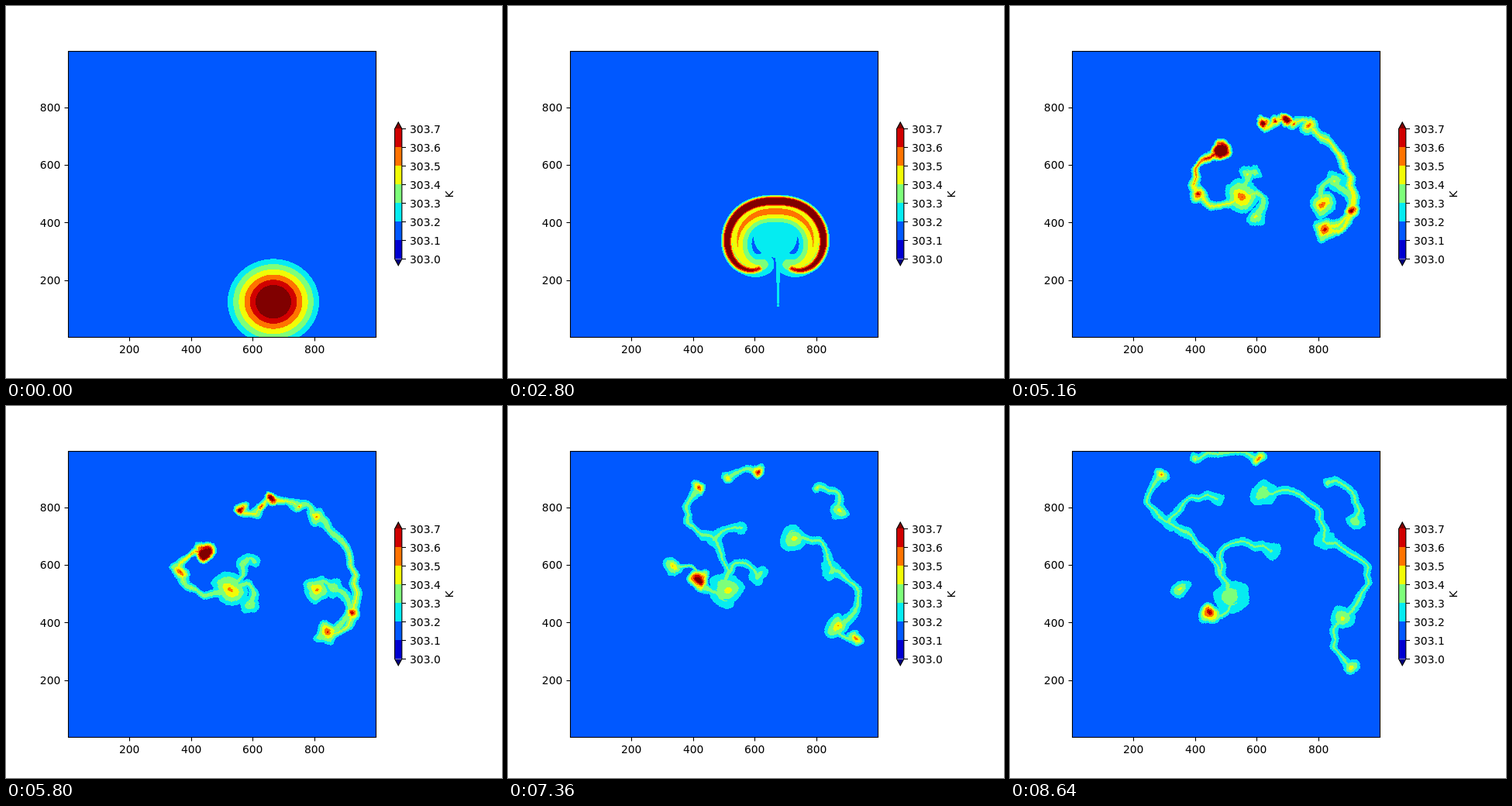
Animation of 640x480 px, one loop 8680 ms. Source, as an HTML page with a canvas:

```html
<!DOCTYPE html>
<html lang="en">
<head>
<meta charset="utf-8">
<title>Rising warm bubble</title>
<style>
  html, body { margin: 0; width: 100%; height: 100%; overflow: hidden; background: #fff; }
  canvas { position: absolute; left: 80px; top: 58px; }
  svg { position: absolute; left: 0; top: 0; }
  text { font: 13.89px "DejaVu Sans", sans-serif; }
</style>
</head>
<body>
<canvas id="field" width="398" height="370"></canvas>
<svg id="chart" width="640" height="480" viewBox="0 0 640 480"></svg>
<script>
const LOOP = 8680, STEP = 40;
const LEFT = 80, TOP = 58, W = 398, H = 370;
const ASPECT = 1.07, MID = 344.5, BREAKUP = 3840;
const COLORS = ['#000080', '#0000d1', '#0058ff', '#05ecf1', '#7dff7a', '#f1fc06', '#ff7300', '#d10000', '#800000'];

const clamp = (v, lo = 0, hi = 1) => Math.max(lo, Math.min(hi, v));
const mix = (a, b, f) => a + (b - a) * f;
function tween(t, times, values) {
  const i = clamp(times.findIndex(k => k > t) - 1, 0, times.length - 2);
  const k = t >= times[times.length - 1] ? times.length - 2 : i;
  return mix(values[k], values[k + 1], clamp((t - times[k]) / (times[k + 1] - times[k])));
}

// --- temperature field: the warmest of many cone-shaped dabs ---

const ctx = document.getElementById('field').getContext('2d');
const image = ctx.createImageData(W, H);
const pixels = new Uint32Array(image.data.buffer);
const heat = new Float32Array(W * H);
const palette = COLORS.map(c => {
  const n = parseInt(c.slice(1), 16);
  return (0xff000000 | (n & 255) << 16 | (n & 0xff00) | n >> 16) >>> 0;
});

function dab(x, y, r, peak) {
  if (r < 0.4) return;
  x -= LEFT; y -= TOP;
  const x0 = Math.max(0, Math.ceil(x - r)), x1 = Math.min(W - 1, Math.floor(x + r));
  const y0 = Math.max(0, Math.ceil(y - r)), y1 = Math.min(H - 1, Math.floor(y + r));
  for (let j = y0; j <= y1; j++) {
    const dy = (j - y) * ASPECT;
    for (let i = x0; i <= x1; i++) {
      const d2 = (i - x) ** 2 + dy * dy, k = j * W + i;
      if (d2 < r * r) heat[k] = Math.max(heat[k], 1 + (peak - 1) * (1 - Math.sqrt(d2) / r));
    }
  }
}

// --- rising cap: a disk that flattens into an arch whose ends roll up ---

const CAP_TIMES = [0, 880, 1760, 2800, BREAKUP, 4500];
const CAP = {
  top: [326, 317, 289, 243, 192, 160],
  halfWidth: [59, 59, 58, 71, 85, 92],
  turn: [3.1, 3.1, 3.1, 3.5, 7, 8],
  rim: [59, 58.5, 32, 9, 10, 0],
  rimHeat: [9.2, 9.2, 9, 11, 9.5, 5],
  inner: [59, 58.5, 32, 20, 13, 0],
  innerHeat: [9.2, 9.2, 8, 4.8, 2.8, 2],
  core: [59, 58, 30, 28, 0, 0],
  coreHeat: [9.2, 9.2, 8, 2, 1.5, 1]
};
const capAt = t => Object.fromEntries(Object.entries(CAP).map(([k, v]) => [k, tween(t, CAP_TIMES, v)]));

// Half of the arch, from the crown outwards; its heading turns ever faster.
function archHalf(cap, inset) {
  const N = 70, points = [];
  let x = 0, y = 0, widest = 0;
  for (let n = 0; n <= N; n++) {
    points.push([x, y]);
    const heading = cap.turn * ((n + 0.5) / N) ** 1.5;
    x += Math.cos(heading); y += Math.sin(heading);
    widest = Math.max(widest, x);
  }
  const scale = Math.max(0, cap.halfWidth - cap.rim - inset) / widest;
  const crown = cap.top + cap.rim / ASPECT + inset;
  return points.map(([px, py]) => [px * scale, crown + py * scale * 1.15]);
}

function drawArch(cap, inset, r, peak) {
  const half = archHalf(cap, inset);
  for (const side of [-1, 1]) {
    let last = null;
    half.forEach(([x, y], n) => {
      if (last && Math.hypot(x - last[0], y - last[1]) < 0.7) return;
      last = [x, y];
      const u = n / half.length;
      dab(MID + side * x, y, r * (1 - 0.25 * u * u), 1 + (peak - 1) * (1 - 0.5 * u * u));
    });
  }
}

function drawCap(t) {
  if (t >= 4500) return;
  const cap = capAt(t);
  drawArch(cap, 0, cap.rim, cap.rimHeat);
  drawArch(cap, 1.2 * Math.max(0, cap.inner - cap.rim), cap.inner, cap.innerHeat);
  dab(MID, cap.top + 55, cap.core, cap.coreHeat);
  const stem = clamp((t - 1600) / 400) * clamp((3400 - t) / 400);
  const foot = 388 + (2800 - t) * 0.035;
  for (let u = 0; stem && u <= 1; u += 0.02)
    dab(MID + 3.5, mix(cap.top + 65, foot, u), stem * mix(5, 1.2, Math.sqrt(u)), 1.6);
}

// --- break-up: the arch falls apart into drifting eddies joined by threads ---

const EDDY_TIMES = [BREAKUP, 5160, 6400, 8640];
const archAtBreakup = archHalf(capAt(BREAKUP), 0);

// An eddy leaves the arch at fraction u of one side and passes three points.
function eddy(side, u, size, peak, ...path) {
  const [x, y] = archAtBreakup[Math.round(u * (archAtBreakup.length - 1))];
  const stops = [[MID + side * x, y], ...path];
  return { side, size, peak, xs: stops.map(p => p[0]), ys: stops.map(p => p[1]) };
}
const eddies = {
  leftVortex: eddy(-1, 1, 26, 5, [297, 245], [280, 228], [285, 245]),
  leftHead: eddy(-1, 0.2, 17, 12, [270, 187], [240, 190], [255, 267]),
  satellite: eddy(-1, 0.45, 14, 6, [241, 243], [207, 187], [219, 234]),
  leftLobe: eddy(-1, 0.75, 14, 3.5, [318, 273], [312, 242], [338, 185]),
  wing: eddy(-1, 0.9, 12, 3.4, [305, 215], [310, 188], [205, 150]),
  wingTip: eddy(-1, 0.9, 10, 3, [315, 215], [325, 186], [268, 118]),
  crownLeft: eddy(-1, 0.05, 11, 8, [325, 150], [283, 115], [194, 89]),
  crown: eddy(1, 0, 9, 6, [340, 150], [318, 108], [238, 67]),
  crownRight: eddy(1, 0.07, 11, 9, [355, 145], [327, 96], [320, 67]),
  shoulder: eddy(1, 0.15, 8, 5, [365, 150], [390, 112], [408, 97]),
  farRight: eddy(1, 0.22, 14, 5, [385, 155], [413, 128], [446, 147]),
  rightFlank: eddy(1, 0.42, 12, 7, [441, 265], [455, 270], [440, 335]),
  rightVortex: eddy(1, 1, 20, 5, [402, 255], [398, 217], [326, 113]),
  rightInner: eddy(1, 0.9, 15, 3.4, [418, 225], [425, 240], [405, 173]),
  rightLobe: eddy(1, 0.6, 18, 6, [405, 288], [421, 294], [427, 273])
};

// Thread between two eddies; bend is its bow as a share of its length.
const thread = (a, b, bend, until = Infinity, from = BREAKUP) => ({ a: eddies[a], b: eddies[b], bend, until, from });
const threads = [
  thread('leftHead', 'satellite', -0.25, 7600),
  thread('satellite', 'leftVortex', -0.25, 6200),
  thread('crownLeft', 'crown', -0.4, 7000),
  thread('crown', 'crownRight', 0.1),
  thread('crownRight', 'shoulder', 0.1, 7300),
  thread('shoulder', 'farRight', 0.3),
  thread('farRight', 'rightFlank', 0.15, 6600),
  thread('rightFlank', 'rightLobe', 0.25),
  thread('rightVortex', 'rightInner', 0.3),
  thread('rightInner', 'rightLobe', 0.45),
  thread('leftVortex', 'leftLobe', 0.6),
  thread('leftVortex', 'leftHead', 0.3, Infinity, 6600),
  thread('leftVortex', 'wing', -0.1),
  thread('crownLeft', 'wing', -0.35, Infinity, 6200),
  thread('wing', 'wingTip', 0.2)
];

const place = (e, t) => [tween(t, EDDY_TIMES, e.xs), tween(t, EDDY_TIMES, e.ys)];

function drawEddy(e, t) {
  const [x, y] = place(e, t);
  const size = e.size * clamp((t - BREAKUP) / 900);
  const peak = 1 + (e.peak - 1) * Math.exp(-Math.max(0, t - 5160) / 5000);
  for (let f = 0; f <= 1; f += 0.02) {
    const angle = e.side * (t / 700 + 7 * f), reach = 0.55 * size * f;
    dab(x + reach * Math.cos(angle), y + reach * Math.sin(angle),
        size * (0.75 - 0.35 * f), 1 + (peak - 1) * (1 - 0.6 * f));
  }
}

function drawThread({ a, b, bend, until, from }, t) {
  const strength = clamp((t - from) / 400) * clamp((until - t) / 400);
  if (!strength) return;
  const [x0, y0] = place(a, t), [x1, y1] = place(b, t);
  const dx = x1 - x0, dy = y1 - y0, fresh = Math.exp(-(t - BREAKUP) / 1400);
  const steps = Math.ceil(Math.hypot(dx, dy) * 0.8) + 2;
  for (let n = 0; n <= steps; n++) {
    const u = n / steps, bow = 4 * bend * u * (1 - u);
    const r = (5.5 + 3.5 * fresh) * (1 + 0.2 * Math.cos(2 * Math.PI * u));
    dab(x0 + dx * u + dy * bow, y0 + dy * u - dx * bow, r * strength,
        2.3 + Math.max(0, mix(a.peak, b.peak, u) - 2.3) * fresh);
  }
}

// --- drawing ---

function render(t) {
  heat.fill(0.5);
  drawCap(t);
  if (t > BREAKUP) {
    threads.forEach(s => drawThread(s, t));
    Object.values(eddies).forEach(e => drawEddy(e, t));
  }
  // A slight ripple makes the contours uneven as the flow turns turbulent.
  const amp = 1.8 * clamp((t - 2400) / 3000);
  const ripple = (s, phase) => Math.round(amp * Math.sin(s / 5.3 + 1.4 * Math.sin(s / 13) + phase + t / 900));
  const shiftY = Array.from({ length: W }, (_, x) => ripple(x, 2));
  for (let y = 0; y < H; y++) {
    const dx = ripple(y, 0);
    for (let x = 0; x < W; x++) {
      const sx = clamp(x + dx, 0, W - 1), sy = clamp(y + shiftY[x], 0, H - 1);
      pixels[y * W + x] = palette[clamp(Math.floor(heat[sy * W + sx]) + 2, 0, 8)];
    }
  }
  ctx.putImageData(image, 0, 0);
}

function drawChart() {
  const line = (x1, y1, x2, y2) => `<path d="M${x1} ${y1}L${x2} ${y2}" stroke="#000" stroke-width="1.1"/>`;
  const label = (x, y, s, anchor) => `<text x="${x}" y="${y}" text-anchor="${anchor}">${s}</text>`;
  const snap = v => Math.round(v) + 0.5;
  let out = '<rect x="80.5" y="58.5" width="397" height="369" fill="none" stroke="#000" stroke-width="1.1"/>';
  for (let v = 200; v <= 800; v += 200) {
    const x = snap(79.3 + v * 0.3985), y = 427.8 - v * 0.3711;
    out += line(x, 428, x, 432.5) + label(x - 0.3, 448, v, 'middle');
    out += line(75.5, snap(y), 80, snap(y)) + label(70.3, Math.round(y + 5.35), v, 'end');
  }
  const x0 = 501.6, x1 = 510.84, mid = 506.22, top = 158.4, bottom = 326.4;
  out += `<path d="M${x0} ${top}L${mid} 150L${x1} ${top}z" fill="${COLORS[8]}"/>`;
  out += `<path d="M${x0} ${bottom}L${mid} 334.8L${x1} ${bottom}z" fill="${COLORS[0]}"/>`;
  for (let i = 0; i < 7; i++)
    out += `<rect x="${x0}" y="${Math.round(bottom - 24 * (i + 1))}" width="${x1 - x0}" height="24" fill="${COLORS[i + 1]}"/>`;
  out += `<path d="M${x0} ${top}L${mid} 150L${x1} ${top}V${bottom}L${mid} 334.8L${x0} ${bottom}z" fill="none" stroke="#000" stroke-width="1.1"/>`;
  for (let i = 0; i < 8; i++) {
    const y = 326.5 - 24 * i;
    out += line(511, y, 516, y) + label(521, y + 5.5, (303 + i / 10).toFixed(1), 'start');
  }
  out += '<text transform="translate(577 243) rotate(-90)" text-anchor="middle">K</text>';
  document.getElementById('chart').innerHTML = out;
}

drawChart();
const start = performance.now();
let shown = -1;
function tick() {
  const t = Math.floor((performance.now() - start) % LOOP / STEP) * STEP;
  if (t !== shown) render(shown = t);
  requestAnimationFrame(tick);
}
tick();
</script>
</body>
</html>
```
